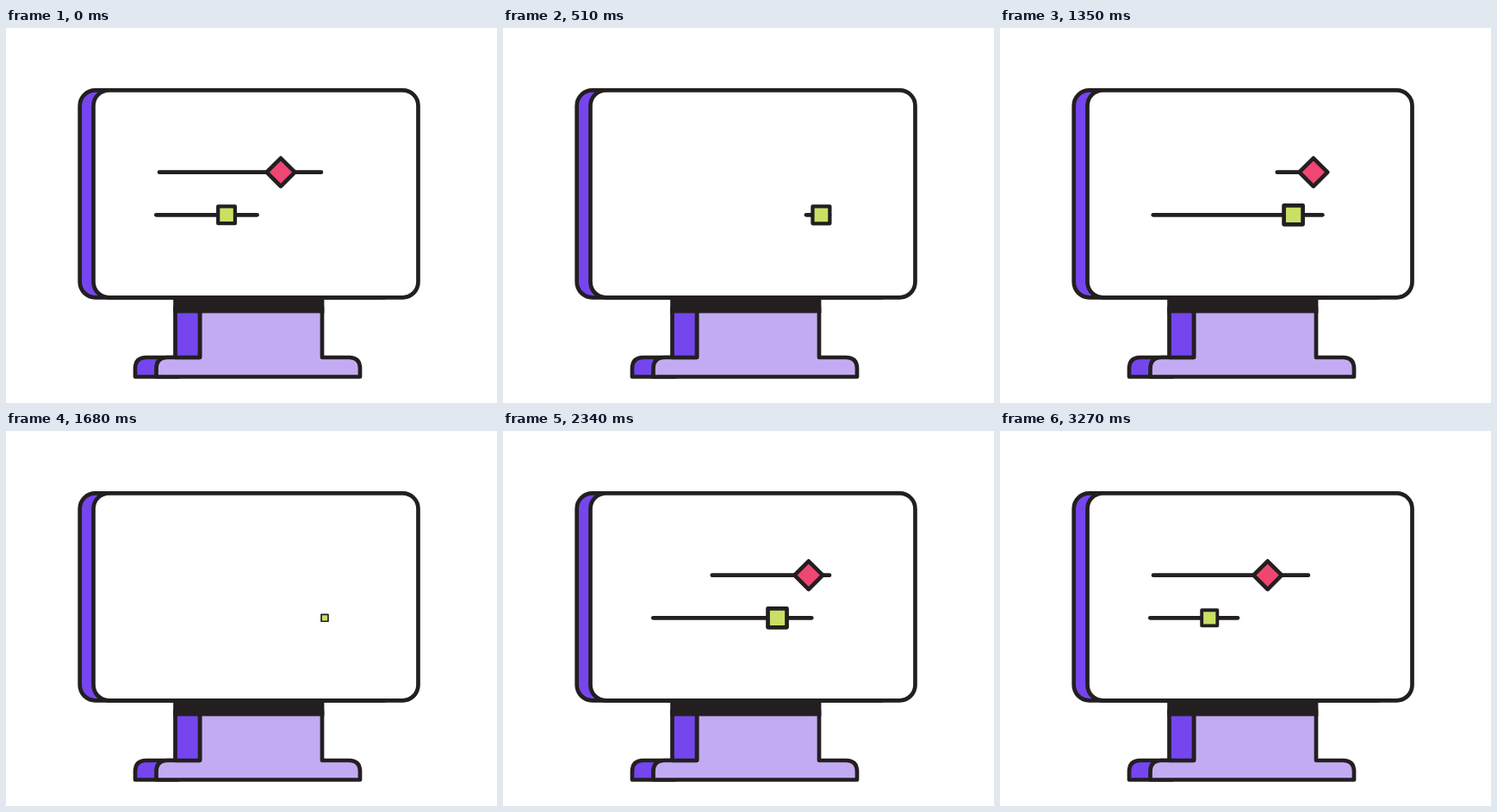
These frames come from a looping animation (570 by 436 pixels, 3.3 s). An HTML page:

```html
<!DOCTYPE html>
<html lang="en">
<head>
<meta charset="utf-8">
<title>Monitor sliders</title>
<style>
  html, body { margin: 0; width: 100%; height: 100%; overflow: hidden; background: #fff; }
  svg { display: block; width: 100vw; height: 100vh; }
</style>
</head>
<body>
<svg viewBox="0 0 570 436" stroke="#231f20" stroke-width="4.7" stroke-linejoin="round" stroke-linecap="round">
  <!-- base and neck -->
  <path fill="#7546ee" d="M150 405.5V396Q150 383 163 383H200V405.5Z"/>
  <path fill="#c3abf3" d="M174.5 405.5V396Q174.5 383 187.5 383H225V325H367V383H398Q411 383 411 396V405.5Z"/>
  <path fill="#7546ee" d="M196.5 325H225V383H196.5Z"/>
  <path fill="#231f20" stroke="none" d="M194.2 313H369.4V331.5H194.2Z"/>
  <!-- screen -->
  <rect fill="#7546ee" x="85.7" y="72.3" width="370" height="241" rx="18"/>
  <rect fill="#fff" x="101.5" y="72.3" width="377" height="241" rx="18"/>
  <!-- sliders -->
  <path id="pinkLine" fill="none"/>
  <path id="pinkKnob" fill="#ef4672" d="M0-16.4L16.4 0L0 16.4L-16.4 0Z"/>
  <path id="limeLine" fill="none"/>
  <path id="limeKnob" fill="#c9e064" d="M-11-11H11V11H-11Z"/>
</svg>
<script>
const STEP = 30, FRAMES = 110, LAST = 107, CYCLE = 36, FIRST = 23;

// Every span is [start, duration], counted in steps of one cycle.
const sliders = [
  { name: 'pink', y: 167.7, left: 178, right: 379, from: 178, to: 367,
    grow: [23, 9], move: [24.1, 24], draw: [25.2, 14.5], erase: [37.4, 12], shrink: [45.4, 7.4] },
  { name: 'lime', y: 217.3, left: 174.3, right: 379, from: 174, to: 370,
    grow: [29.2, 10], move: [30.3, 24], draw: [29.8, 17.9], erase: [44, 12], shrink: [51.6, 7.4] }
];
for (const s of sliders) {
  s.line = document.getElementById(s.name + 'Line');
  s.knob = document.getElementById(s.name + 'Knob');
}

const clamp = v => Math.min(1, Math.max(0, v));
const part = (p, [start, length]) => clamp((p - start) / length);
const mix = (a, b, k) => a + (b - a) * k;
const easeOut = t => 1 - (1 - t) ** 2;
const easeInOut = t => t * t * (3 - 2 * t);
const easeErase = t => 1 - (1 - t * t) ** 2.45;
const show = (el, on) => el.setAttribute('visibility', on ? 'visible' : 'hidden');

function drawSlider(s, p) {
  const drawn = easeOut(part(p, s.draw));
  const erased = easeErase(part(p, s.erase));
  const x = mix(s.from, s.to, easeOut(part(p, s.move)));
  const size = easeOut(part(p, s.grow)) * (1 - easeInOut(part(p, s.shrink)));

  show(s.line, drawn > 0 && erased < 0.96);
  s.line.setAttribute('d', `M${mix(s.left, s.right, erased)} ${s.y}H${mix(s.left, s.right, drawn)}`);
  show(s.knob, size > 0.01);
  s.knob.setAttribute('transform', `translate(${x} ${s.y}) scale(${size})`);
}

function render(ms) {
  // The last pose is held briefly before the loop restarts.
  const frame = Math.min(LAST, Math.floor(ms / STEP) % FRAMES);
  const phase = frame % CYCLE;
  const p = phase < FIRST ? phase + CYCLE : phase;
  for (const s of sliders) drawSlider(s, p);
}

const begin = performance.now();
function tick() {
  render(performance.now() - begin);
  requestAnimationFrame(tick);
}
tick();
</script>
</body>
</html>
```
